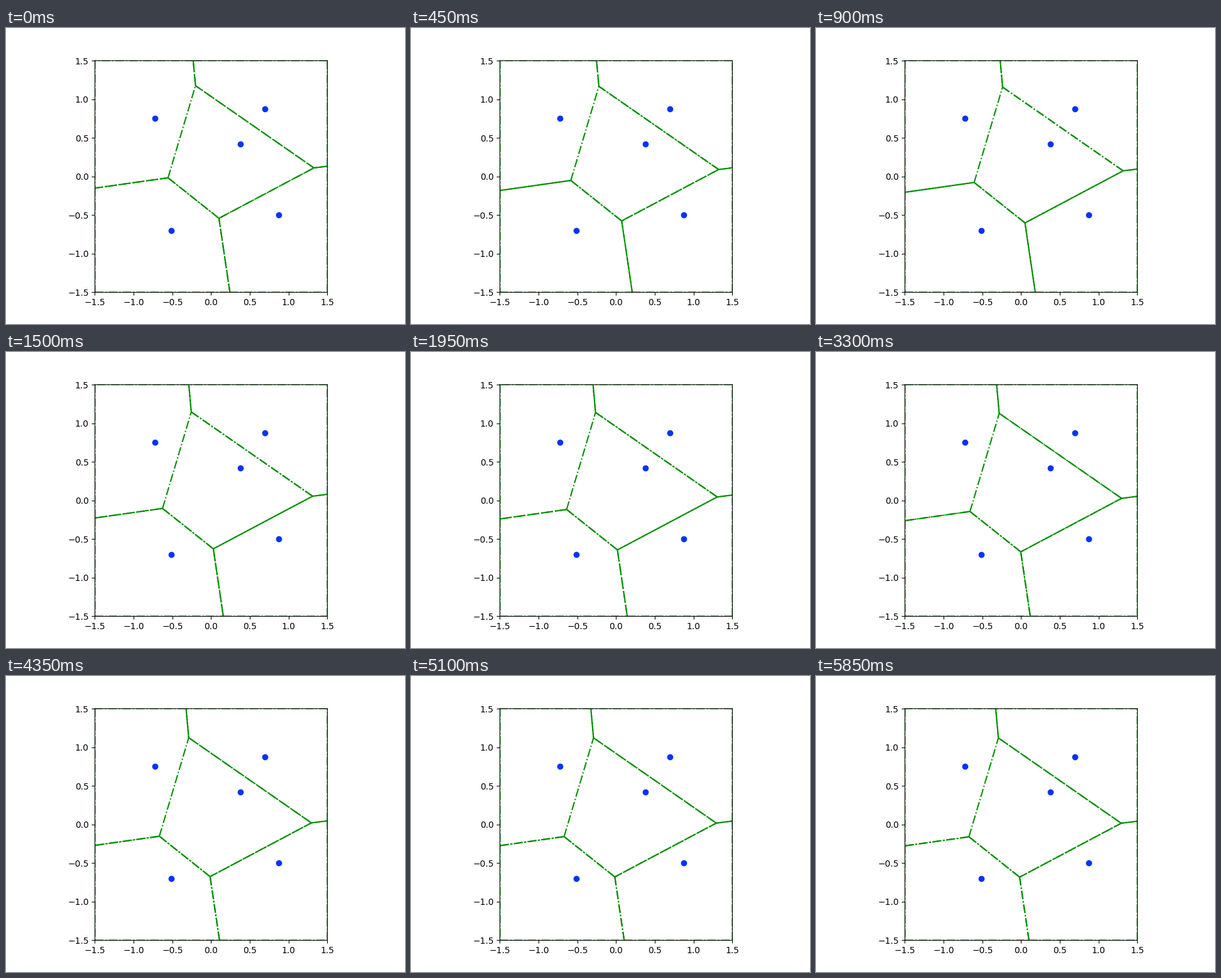
A matplotlib script for the animation above (5.95 s loop, 635 by 472 pixels).

```python
import numpy as np
import matplotlib.pyplot as plt
from matplotlib.animation import FuncAnimation

W, H, DPI = 635, 472, 100
LEFT, TOP, RIGHT, BOTTOM = 141.49, 52, 511.49, 421.49   # plot box in pixels
STEPS, TICK, HOLD = 40, 50, 3   # each step is held for three ticks
HALF = 1.5
RATE = 0.083                    # step size of the weight update
GREEN, BLUE = "#008f00", "#0433ff"

A, B, C, D, E = range(5)
SITES = np.array([[-0.723, 0.7503], [0.696, 0.878], [0.379, 0.423],
                  [0.868, -0.4957], [-0.517, -0.6997]])
START = np.array([-0.452, -0.009, 0.0, -0.417, -0.601])


def bisector(i, j, w):
    """Line n.x = c on which sites i and j have equal power."""
    n = 2 * (SITES[j] - SITES[i])
    c = SITES[j] @ SITES[j] - SITES[i] @ SITES[i] - w[j] + w[i]
    return n, c


def crossing(line1, line2):
    return np.linalg.solve([line1[0], line2[0]], [line1[1], line2[1]])


def cells(w):
    """Power cells inside the square, each counter-clockwise."""
    def node(i, j, k):
        return crossing(bisector(i, j, w), bisector(i, k, w))

    def wall(i, j, normal):
        return crossing(bisector(i, j, w), (normal, HALF))

    top_node, right_node = node(A, B, C), node(B, C, D)
    low_node, left_node = node(C, D, E), node(A, C, E)
    top, bottom = wall(A, B, (0, 1)), wall(D, E, (0, -1))
    right, left = wall(B, D, (1, 0)), wall(A, E, (-1, 0))
    sw, se, ne, nw = HALF * np.array([[-1, -1], [1, -1], [1, 1], [-1, 1]])
    return [np.array(c) for c in (
        [nw, left, left_node, top_node, top],
        [ne, top, top_node, right_node, right],
        [left_node, low_node, right_node, top_node],
        [se, right, right_node, low_node, bottom],
        [sw, bottom, low_node, left_node, left],
    )]


def area(poly):
    x, y = poly.T
    return 0.5 * np.sum(x * np.roll(y, -1) - np.roll(x, -1) * y)


def edges(polys):
    """Edges of all cells; the inner cell stays open."""
    out = []
    for i, poly in enumerate(polys):
        pairs = list(zip(poly, np.roll(poly, -1, axis=0)))
        out += pairs[:-1] if i == C else pairs
    return out


# Gradient ascent towards equal areas
share = (2 * HALF) ** 2 / len(SITES)
weights = START.copy()
history = []
for _ in range(STEPS):
    polys = cells(weights)
    history.append(edges(polys))
    weights = weights + RATE * (share - np.array([area(p) for p in polys]))

fig = plt.figure(figsize=(W / DPI, H / DPI), dpi=DPI, facecolor="white")
ax = fig.add_axes([LEFT / W, 1 - BOTTOM / H,
                   (RIGHT - LEFT) / W, (BOTTOM - TOP) / H])
ax.set_xlim(-HALF, HALF)
ax.set_ylim(-HALF, HALF)
ticks = np.arange(-3, 4) / 2
ax.set_xticks(ticks)
ax.set_yticks(ticks)
for spine in ax.spines.values():
    spine.set_snap(False)

lines = [ax.plot([], [], "-.", color=GREEN, lw=1.5, snap=False)[0]
         for _ in history[0]]
ax.plot(*SITES.T, "o", color=BLUE, ms=6)


def draw(i):
    for line, (p, q) in zip(lines, history[i // HOLD]):
        line.set_data([p[0], q[0]], [p[1], q[1]])
    return lines


# The last step is one tick shorter than the others
anim = FuncAnimation(fig, draw, frames=STEPS * HOLD - 1, interval=TICK,
                     repeat=True, repeat_delay=0, blit=False)
plt.show()
```
